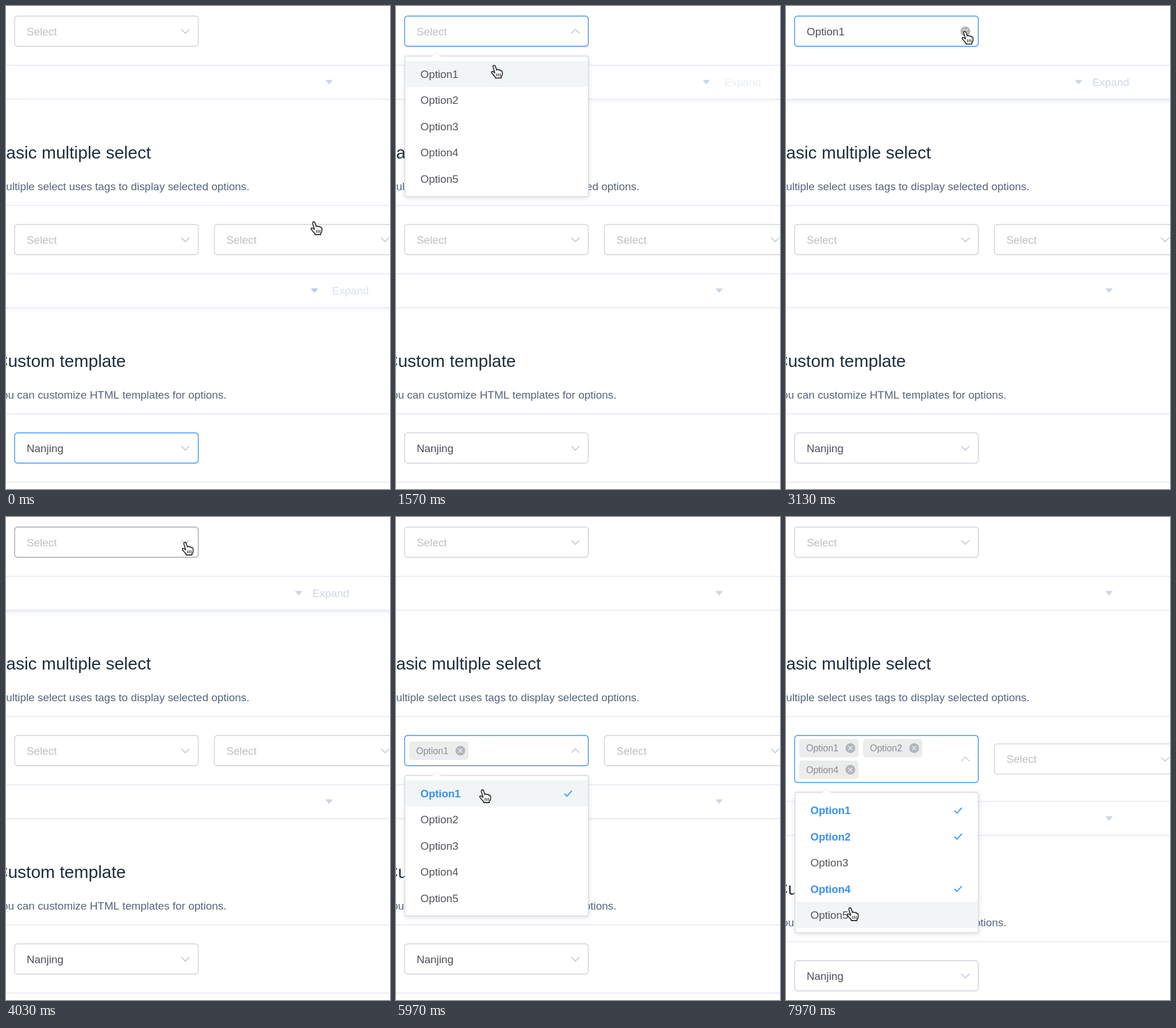
These frames come from a looping animation (668 px wide and 839 px high, 8000 ms). An HTML page with a canvas:

```html
<!DOCTYPE html>
<html lang="en">
<head>
<meta charset="utf-8">
<title>Select demo</title>
<style>
  html, body { margin: 0; width: 100%; height: 100%; overflow: hidden; background: #fff; }
  canvas { display: block; }
</style>
</head>
<body>
<canvas width="668" height="839"></canvas>
<script>
const LOOP = 8000;
const FONT = '"Liberation Sans", Arial, sans-serif';
const GRAY = [205, 209, 217], DARK = [163, 166, 171], BLUE = [54, 144, 245], PALE = [205, 215, 226];
const ROW = 45.4;
const ctx = document.querySelector('canvas').getContext('2d');
let t = 0;

const clamp = v => Math.min(1, Math.max(0, v));
const mix = (a, b, p) => a.map((v, i) => v + (b[i] - v) * p);
const rgb = (c, alpha = 1) => `rgba(${c.map(Math.round)},${alpha})`;

function bezier(x1, y1, x2, y2) {
  const at = (a, b, s) => 3 * (1 - s) ** 2 * s * a + 3 * (1 - s) * s * s * b + s ** 3;
  return x => {
    let lo = 0, hi = 1;
    for (let i = 0; i < 20; i++) {
      const mid = (lo + hi) / 2;
      if (at(x1, x2, mid) < x) lo = mid; else hi = mid;
    }
    return at(y1, y2, hi);
  };
}
const ease = bezier(.25, .1, .25, 1);
const zoom = bezier(.23, 1, .32, 1);
const glide = bezier(.6, 0, .35, 1);

// Value after a series of [time, target] transitions
function track(value, keys, duration, curve = ease) {
  for (const [at, to] of keys) value += (to - value) * curve(clamp((t - at) / duration));
  return value;
}

// start, duration, x, y
const MOVES = [
  [30, 480, 321, 58], [1270, 440, 155, 122], [2090, 340, 238, 73], [2480, 700, 316, 55],
  [4030, 740, 318.5, 413], [5300, 520, 155, 485], [5980, 410, 140, 531], [6790, 270, 125, 611],
  [7430, 500, 116, 690]
];
const cursorAt = () => MOVES.reduce(
  (pos, [at, duration, x, y]) => mix(pos, [x, y], glide(clamp((t - at) / duration))), [540, 386]);

const HAND = new Path2D('M-3.5 2L-6.5-8Q-7-11-4.7-11Q-2.8-11-2.2-8.5L-.5-3Q1.5-5 3-2.7Q5.5-4 6.5-1.5' +
  'Q9-2.5 9.5 .5Q10.3 6 7.5 9V11H-2.5L-2.8 9Q-6 6-9 2Q-10-.5-7.5-.5Q-6 0-3.5 2Z');
const FINGERS = new Path2D('M0 3V8M3 3V8M6 3V8');
const ARROW = new Path2D('M-5-10V9L-1 5L2 12L5 11L2 4H8Z');

function text(str, x, y, color, size = 18.85, { align = 'left', weight = 400 } = {}) {
  ctx.font = `${weight} ${size}px ${FONT}`;
  ctx.textAlign = align;
  ctx.fillStyle = color;
  ctx.fillText(str, x, y);
}

function line(points, color, width = 1.4) {
  ctx.beginPath();
  points.forEach(([x, y]) => ctx.lineTo(x, y));
  ctx.strokeStyle = color;
  ctx.lineWidth = width;
  ctx.stroke();
}

function box(x, y, w, h, radius, fill, stroke) {
  ctx.beginPath();
  ctx.roundRect(x, y, w, h, radius);
  ctx.fillStyle = fill;
  ctx.fill();
  if (!stroke) return;
  ctx.strokeStyle = stroke;
  ctx.lineWidth = 1.4;
  ctx.stroke();
}

// Drop shadow kept outside the box, so translucent boxes stay clean
function shadow(x, y, w, h, color, blur) {
  ctx.save();
  ctx.beginPath();
  ctx.rect(-100, -500, 900, 2000);
  ctx.rect(x, y, w, h);
  ctx.clip('evenodd');
  ctx.shadowColor = color;
  ctx.shadowBlur = blur;
  ctx.shadowOffsetY = 2;
  ctx.fillStyle = '#fff';
  ctx.fillRect(x, y, w, h);
  ctx.restore();
}

function closeIcon(x, y) {
  box(x - 8.5, y - 8.5, 17, 17, 8.5, '#b2b6ba');
  line([[x - 3.5, y - 3.5], [x + 3.5, y + 3.5]], '#f2f3f4', 1.3);
  line([[x - 3.5, y + 3.5], [x + 3.5, y - 3.5]], '#f2f3f4', 1.3);
}

function select(x, y, label, { hover = 0, focus = 0, open = 0, grow = 0, filled = false, clear = false } = {}) {
  box(x, y, 319.5, 52.5 + grow, 5, '#fff', rgb(mix(mix(GRAY, DARK, hover), BLUE, focus)));
  text(label, x + 21, y + 33, filled ? '#4b4f56' : '#bcbfc5');
  const cx = x + 297, cy = y + 26.5 + grow / 2;
  if (clear) return closeIcon(cx, cy);
  const dip = 3.5 * Math.cos(Math.PI * open);
  line([[cx - 7, cy - dip], [cx, cy + dip], [cx + 7, cy - dip]], '#b9bec7', 1.3);
}

function block(top, divider, bottom, hover, tint) {
  shadow(-60, top, 800, bottom - top, `rgba(215,221,236,${hover * .7})`, 8);
  box(-60, top, 800, bottom - top, 4, '#fff', '#e4e8f2');
  line([[0, divider], [668, divider]], '#e6e9f5');
  const y = (divider + bottom) / 2, x = 562 - 53 * hover;
  const color = mix(PALE, BLUE, tint * .4);
  ctx.fillStyle = rgb(color);
  ctx.beginPath();
  ctx.moveTo(x - 6.5, y - 4);
  ctx.lineTo(x + 6.5, y - 4);
  ctx.lineTo(x, y + 4);
  ctx.fill();
  text('Expand', 533 + 66 * (1 - hover), y + 6.5, rgb(color, clamp(hover + tint * .4)));
}

function section(title, note, titleEnd, noteEnd, y) {
  text(title, titleEnd, y, '#1f2d3d', 30, { align: 'right' });
  text(note, noteEnd, y + 55, '#56647b', 18.95, { align: 'right' });
}

function tag(label, x, y) {
  box(x, y - 16, 103, 32, 5, '#ebeded');
  text(label, x + 12, y + 5.5, '#888c92', 16);
  closeIcon(x + 89, y);
}

function popper(top, open, picked, tipY, checks) {
  if (open < .004) return;
  ctx.save();
  ctx.globalAlpha = open;
  ctx.translate(0, top);
  ctx.scale(1, open);
  shadow(15.5, 0, 319, 244, 'rgba(0,0,0,.14)', 8);
  box(15.5, 0, 319, 244, 3, '#fff', '#d6dbe4');
  ctx.beginPath();
  ctx.moveTo(62.5, 1);
  ctx.lineTo(70.5, -6);
  ctx.lineTo(78.5, 1);
  ctx.fillStyle = '#fff';
  ctx.fill();
  line([[62.5, 0], [70.5, -6], [78.5, 0]], '#e7eaf0', 1);
  const hovered = Math.floor((tipY - top - 8.5) / ROW);
  for (let i = 0; i < 5; i++) {
    const y = 8.5 + i * ROW, on = picked.includes(i + 1);
    if (i === hovered) {
      ctx.fillStyle = '#f1f5f6';
      ctx.fillRect(16.2, y, 317.6, ROW);
    }
    text('Option' + (i + 1), 42.5, y + 29.5, on ? rgb(BLUE) : '#505359', on ? 18.5 : 18.85,
      { weight: on ? 700 : 400 });
    if (on && checks) line([[293, y + 23], [297.5, y + 27.5], [306, y + 18]], rgb(BLUE), 1.8);
  }
  ctx.restore();
}

function cursor(x, y, isHand) {
  ctx.save();
  ctx.translate(x, y);
  ctx.lineJoin = 'round';
  ctx.fillStyle = isHand ? '#fff' : '#111';
  ctx.strokeStyle = isHand ? '#333' : '#fff';
  ctx.lineWidth = 1.8;
  const shape = isHand ? HAND : ARROW;
  ctx.fill(shape);
  ctx.stroke(shape);
  ctx.lineWidth = 1.3;
  if (isHand) ctx.stroke(FINGERS);
  ctx.restore();
}

function draw() {
  ctx.fillStyle = '#fff';
  ctx.fillRect(0, 0, 668, 839);

  const [x, y] = cursorAt(), tipY = y - 10;
  const grow = t >= 7370 ? 29.3 : 0;
  const singleKeys = [[1060, 1], [1985, 0]], multiKeys = [[5103, 1]];
  const picked = [[1, 5970], [2, 6630], [4, 7370]].filter(([, at]) => t >= at).map(([n]) => n);
  const hasValue = t >= 1970 && t < 3580;

  block(-15, 103, 162, track(0, [[300, 1], [1470, 0], [2295, 1], [4320, 0]], 300),
    track(0, [[300, 1], [350, 0], [2265, 1], [2320, 0], [4240, 1], [4320, 0]], 200));
  select(15, 17.5, hasValue ? 'Option1' : 'Select', {
    filled: hasValue,
    clear: hasValue && t >= 2500,
    hover: track(0, [[400, 1], [1480, 0], [2400, 1], [4190, 0]], 200),
    focus: track(0, [[1060, 1], [3540, 0]], 200),
    open: track(0, singleKeys, 300)
  });

  section('Basic multiple select', 'Multiple select uses tags to display selected options.', 252, 423.5, 264.5);
  block(346.5, 465 + grow, 524 + grow, track(0, [[-84, 1], [165, 0], [4490, 1], [5590, 0]], 300),
    track(.3, [[0, 0]], 200));
  select(15, 379.5, picked.length ? '' : 'Select', {
    grow,
    hover: track(0, [[4560, 1]], 200),
    focus: track(0, [[5060, 1]], 200),
    open: track(0, multiKeys, 300)
  });
  select(362.5, 379.5 + grow / 2, 'Select');
  picked.forEach((n, i) => tag('Option' + n, i === 1 ? 134 : 23, grow ? 401.5 + (i > 1 ? 37.5 : 0) : 406));

  section('Custom template', 'You can customize HTML templates for options.', 208.5, 383.5, 626.5 + grow);
  block(708.5 + grow, 827 + grow, 886 + grow, 0, 0);
  select(15, 741.5 + grow, 'Nanjing', { filled: true, focus: track(1, [[870, 0]], 160) });

  popper(87, track(0, singleKeys, 300, zoom), t >= 1970 ? [1] : [], tipY, false);
  popper(449 + grow, track(0, multiKeys, 300, zoom), picked, tipY, true);

  const onHeading = tipY > 162 && tipY < 346 && t < 5000;
  cursor(x, y, !onHeading);
}

function frame() {
  t = performance.now() % LOOP;
  draw();
  requestAnimationFrame(frame);
}
frame();
</script>
</body>
</html>
```
